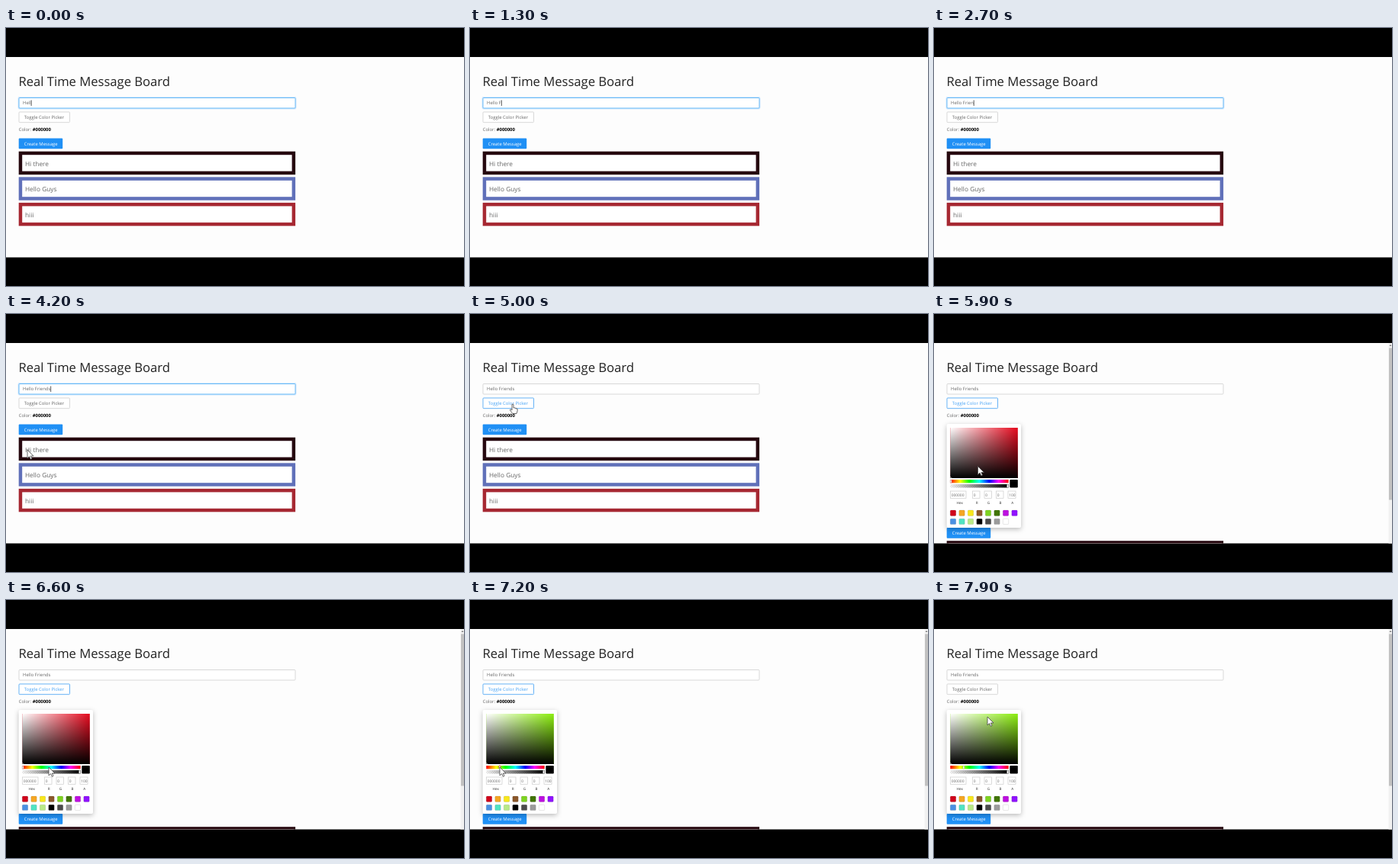
An HTML page that plays this animation: 600x338 px, repeating every 8000 ms.

```html
<!DOCTYPE html>
<html lang="en">
<head>
<meta charset="utf-8">
<title>Real Time Message Board</title>
<style>
html, body { margin: 0; width: 100%; height: 100%; overflow: hidden; background: #000; }
svg { display: block; width: 600px; height: 338px; }
text { font: 5.95px "Open Sans", "Noto Sans", sans-serif; fill: #666; white-space: pre; text-rendering: geometricPrecision; }
.title { font-size: 16.6px; fill: #222; }
.message { font-size: 8.3px; }
.bold { font-weight: 700; fill: #000; }
.small { font-size: 4.9px; }
.label { font-size: 4.6px; fill: #333; text-anchor: middle; }
.field { fill: #fff; stroke: #ccc; stroke-width: .7; }
#picker { filter: drop-shadow(0 2px 3px #0004); }
</style>
</head>
<body>
<svg viewBox="0 0 600 338">
  <defs>
    <linearGradient id="white"><stop stop-color="#fff"/><stop offset="1" stop-color="#fff" stop-opacity="0"/></linearGradient>
    <linearGradient id="black" x2="0" y2="1"><stop stop-opacity="0"/><stop offset="1"/></linearGradient>
    <linearGradient id="alpha"><stop stop-opacity="0"/><stop offset="1"/></linearGradient>
    <linearGradient id="rainbow">
      <stop stop-color="#f00"/><stop offset=".17" stop-color="#ff0"/><stop offset=".33" stop-color="#0f0"/>
      <stop offset=".5" stop-color="#0ff"/><stop offset=".67" stop-color="#00f"/>
      <stop offset=".83" stop-color="#f0f"/><stop offset="1" stop-color="#f00"/>
    </linearGradient>
    <pattern id="checks" width="3" height="3" patternUnits="userSpaceOnUse">
      <path d="M0 0h3v3h-3z" fill="#fff"/><path d="M0 0h1.5v3h1.5v-1.5h-3z" fill="#ddd"/>
    </pattern>
    <clipPath id="page"><path d="M0 38H600V300.5H0z"/></clipPath>
  </defs>
  <path d="M0 0H600V338H0z"/>
  <g clip-path="url(#page)">
    <path d="M0 38H600V301H0z" fill="#fdfdfd"/>
    <text class="title" x="16.5" y="75.7">Real Time Message Board</text>
    <rect id="glow" x="16.5" y="91" width="363" height="14.5" rx="1" fill="none" stroke="#1890ff" stroke-opacity=".2" stroke-width="1.8"/>
    <rect id="input" x="17" y="91.5" width="362" height="13.5" rx="1" fill="#fff" stroke-width=".9"/>
    <text id="typed" x="22" y="100.4"></text>
    <path id="caret" d="M0 94.5v7.5" stroke="#333" stroke-width=".8"/>
    <rect id="toggle" x="17" y="110" width="66.5" height="13.7" rx="1" fill="#fff" stroke-width=".9"/>
    <text id="toggleText" x="23.7" y="119.1">Toggle Color Picker</text>
    <text x="16.7" y="135.2">Color: <tspan class="bold">#000000</tspan></text>
    <g id="lower">
      <rect x="16.7" y="144.5" width="57.5" height="13.7" rx="1" fill="#2090f5"/>
      <text x="23.7" y="153.6" style="fill:#fff">Create Message</text>
      <g id="messages"></g>
    </g>
    <g id="picker">
      <rect x="16.7" y="144" width="97.3" height="136" rx="2" fill="#fff"/>
      <rect id="shade" x="21.3" y="149" width="88.5" height="66"/>
      <rect x="21.3" y="149" width="88.5" height="66" fill="url(#white)"/>
      <rect x="21.3" y="149" width="88.5" height="66" fill="url(#black)"/>
      <circle cx="21.5" cy="214.7" r="1" fill="none" stroke="#fff" stroke-width=".6"/>
      <rect x="21.3" y="217" width="76.3" height="4.3" fill="url(#rainbow)"/>
      <rect id="hueKnob" y="217.3" width="1.8" height="3.7" rx=".5" fill="#fff" stroke="#777" stroke-width=".3"/>
      <rect x="21.3" y="223" width="76.3" height="4.5" fill="url(#checks)"/>
      <rect x="21.3" y="223" width="76.3" height="4.5" fill="url(#alpha)"/>
      <rect x="95.5" y="223.3" width="1.8" height="3.9" rx=".5" fill="#fff"/>
      <rect x="99.3" y="217" width="10.5" height="10.5" rx="1"/>
      <g id="fields"></g>
      <g id="swatches"></g>
    </g>
    <g id="scrollbar">
      <path d="M595.5 38H600V301h-4.5z" fill="#f1f1f1"/>
      <path d="M596 44.5h4V243.5h-4z" fill="#c1c1c1"/>
      <path d="M596.5 42l1.5-2 1.5 2z" fill="#777"/>
    </g>
    <circle id="ring" fill="none" stroke="#dc3c4b" stroke-opacity=".75"/>
    <g id="cursor" fill="#fff" stroke="#444" stroke-width=".8" stroke-linejoin="round">
      <path id="arrow" d="M0 0V11L2.6 8.6 4.3 12.4 6 11.6 4.4 8H8z"/>
      <path id="hand" d="M-1 .5q1-1 2 0V5l1.5-.3.4.7 1.5-.1.3.8 1.4.3V9L5 12.5H-.2L-3.5 8q0-1.5 1.2-1L-1 8z"/>
    </g>
  </g>
</svg>
<script>
const $ = id => document.getElementById(id);
const set = (id, attrs) => {
  for (const key in attrs) $(id).setAttribute(key, attrs[key]);
};
const show = (id, on) => { $(id).style.display = on ? '' : 'none'; };

$('messages').innerHTML = [['Hi there', '#26080f'], ['Hello Guys', '#6070b9'], ['hiii', '#a62832']]
  .map(([text, color], i) => {
    const y = 161.7 + i * 33.6;
    return `<rect x="18.95" y="${y + 2.25}" width="357.9" height="25.9" fill="#fff" stroke="${color}" stroke-width="4.5"/>
      <text class="message" x="25" y="${y + 18.8}">${text}</text>`;
  }).join('');

$('fields').innerHTML = [['Hex', '000000', 21.5, 20.5], ['R', '0', 50.5, 9.5], ['G', '0', 66, 9.5], ['B', '0', 81.5, 9.5], ['A', '100', 97, 10]]
  .map(([name, value, x, w]) =>
    `<rect class="field" x="${x}" y="232" width="${w}" height="9.3"/>
     <text class="small" x="${x + 1.2}" y="238.5">${value}</text>
     <text class="label" x="${x + w / 2 + (w > 20 ? 2 : .8)}" y="248.8">${name}</text>`).join('');

$('swatches').innerHTML = 'D0021B F5A623 F8E71C 8B572A 7ED321 417505 BD10E0 9013FE 4A90E2 50E3C2 B8E986 000000 4A4A4A 9B9B9B FFFFFF'
  .split(' ').map((color, i) =>
    `<rect x="${21.3 + i % 8 * 11.5}" y="${257 + (i >> 3) * 11.2}" width="7.4" height="7.4" rx="1.2"
      fill="#${color}" stroke="#000" stroke-opacity=".2" stroke-width=".5"/>`).join('');

const phrase = 'Hello Friends';
const keyTimes = [300, 700, 1300, 1600, 2000, 2300, 2600, 2900, 3200];
const openAt = 5200, pickAt = 7150;
const clicks = [5050, pickAt];
// time, x, y
const path = [
  [3800, -8, 214], [4200, 28, 178], [4900, 56, 118], [5500, 56, 118],
  [6100, 58, 228], [6600, 56, 219], [7050, 39, 219], [7400, 39, 219], [7800, 70, 153]
];

function cursorAt(t) {
  const i = path.findIndex(p => p[0] > t);
  if (i < 1) return path[i ? path.length - 1 : 0].slice(1);
  const [t0, x0, y0] = path[i - 1], [t1, x1, y1] = path[i];
  const u = (t - t0) / (t1 - t0), k = u * u * (3 - 2 * u);
  return [x0 + (x1 - x0) * k, y0 + (y1 - y0) * k];
}

function draw(t) {
  const open = t >= openAt, picked = t >= pickAt, focused = t < 5000;
  const [x, y] = cursorAt(t);
  const onButton = x > 17 && x < 83 && y > 110 && y < 124;
  const active = onButton || (t >= 5000 && t < 7300);

  $('typed').textContent = phrase.slice(0, 4 + keyTimes.filter(k => k <= t).length);
  set('caret', { transform: `translate(${22.4 + $('typed').getComputedTextLength()})` });
  show('caret', focused);
  show('glow', focused);
  set('input', { stroke: focused ? '#5cb3f5' : '#d4d4d4' });
  set('toggle', { stroke: active ? '#55aaf5' : '#d4d4d4' });
  $('toggleText').style.fill = active ? '#45a2f5' : '#666';

  show('picker', open);
  show('scrollbar', open);
  set('lower', { transform: `translate(0 ${open ? 135.5 : 0})` });
  set('shade', { fill: picked ? '#8cee10' : '#e60a1e' });
  set('hueKnob', { x: picked ? 38 : 21.3 });

  show('cursor', t >= 3800);
  set('cursor', { transform: `translate(${x} ${y})` });
  show('hand', onButton);
  show('arrow', !onButton);

  const click = clicks.find(c => t >= c && t < c + 400);
  show('ring', click !== undefined);
  if (click !== undefined) {
    const r = Math.min(1, (t - click) / 250) * 10;
    set('ring', { cx: x, cy: y - .5, r: r * .75, 'stroke-width': r / 2 });
  }
}

function loop() {
  draw(Math.floor(performance.now() % 8000 / 100) * 100);
  requestAnimationFrame(loop);
}
loop();
</script>
</body>
</html>
```
